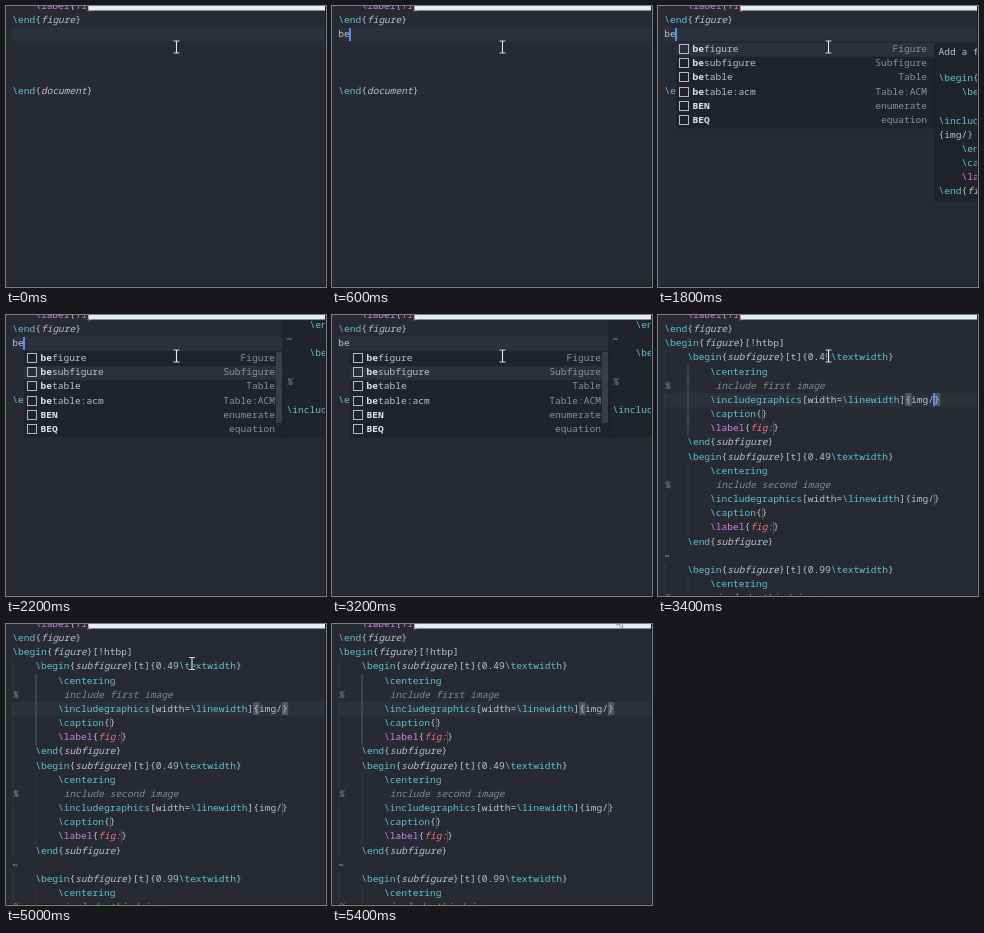
Write an HTML page with a canvas that moves like this. It is 320x281 px and loops after 5.6 s.

```html
<!DOCTYPE html>
<html lang="en">
<head>
<meta charset="utf-8">
<title>LaTeX snippet completion</title>
<style>
html, body { margin: 0; width: 100%; height: 100%; overflow: hidden; background: #272a32; }
canvas { display: block; width: 320px; height: 281px; }
</style>
</head>
<body>
<canvas width="320" height="281"></canvas>
<script>
const ctx = document.querySelector('canvas').getContext('2d');
const LOOP = 5600, LEFT = 6.2, CHAR = 5.74, PITCH = 14.17, FIRST = 14;
const FONT = '9.57px "Noto Sans Mono", monospace';
const color = {
  back: '#272a32', line: '#2c303b', popup: '#20232a', selected: '#2d313b', edge: '#1b1e24',
  text: '#bac1cd', command: '#5cc3d2', label: '#d27fe8', key: '#ec727c', comment: '#838995',
  strong: '#dfe2e8', detail: '#8b909a', guide: '#343841', activeGuide: '#555b67',
  tabStop: '#4c525e', bracket: '#515762', caret: '#528bff', paper: '#e4edf4'
};

const subfigure = (width, order) => [
  `    \\begin{subfigure}[t]{${width}\\textwidth}`,
  '        \\centering',
  `%        include ${order} image`,
  '        \\includegraphics[width=\\linewidth]{img/}',
  '        \\caption{}',
  '        \\label{fig:}',
  '    \\end{subfigure}'
];
const head = ['    \\label{fig:}', '\\end{figure}'];
const expanded = [...head, '\\begin{figure}[!htbp]',
  ...subfigure('0.49', 'first'), ...subfigure('0.49', 'second'), '~',
  ...subfigure('0.99', 'third').slice(0, 3)];
const figureDoc = ['\\begin{figure}[!htbp]', '    \\begin{center}', '', '\\includegraphics',
  '{img/}', '    \\end{center}', '    \\caption{}', '    \\label{fig:}', '\\end{figure}'];
const subfigureDoc = ['    \\end{subfigure}', '~', '    \\begin{subfigure}', '', '%', '',
  '\\includegraphics'];
const choices = [['befigure', 'Figure'], ['besubfigure', 'Subfigure'], ['betable', 'Table'],
  ['betable:acm', 'Table:ACM'], ['BEN', 'enumerate'], ['BEQ', 'equation']];

const rowY = row => FIRST + (row - 1) * PITCH;
const columnX = column => LEFT + column * CHAR;

function rect(x, y, w, h, fill) {
  ctx.fillStyle = fill;
  ctx.fillRect(x, y, w, h);
}

function write(text, x, y, fill, style = '') {
  ctx.font = `${style} ${FONT}`;
  ctx.fillStyle = fill;
  ctx.fillText(text, x, Math.round(y + 3.1));
}

function codeLine(line, x, y) {
  if (line[0] === '%') {
    write('%', x, y, color.comment, 'italic');
    write(line.slice(1), x + CHAR, y, color.comment, 'italic');
    return;
  }
  let column = 0, command = '', inBraces = false;
  for (const token of line.match(/\\\w+|[{}]|[^\\{}]+/g) || []) {
    let fill = color.text, style = '';
    if (token[0] === '\\') {
      command = token;
      fill = token === '\\label' ? color.label : color.command;
    } else if (token === '{') {
      inBraces = true;
    } else if (token === '}') {
      inBraces = false;
      command = '';
    } else if (inBraces && /begin|end$|label/.test(command)) {
      style = 'italic';
      if (command === '\\label') fill = color.key;
    }
    write(token, x + column * CHAR, y, fill, style);
    column += token.length;
  }
}

function snippetMarks() {
  expanded.forEach((line, row) => {
    if (row < 3) return;
    const top = Math.round(rowY(row) - 7), indent = line.search(/\S/);
    const guide = (column, fill) => rect(Math.ceil(columnX(column)) - 0.5, top, 1, 15, fill);
    const deep = indent >= 8 || line[0] === '%';
    if (indent >= 4) guide(0, color.guide);
    if (deep) guide(4, row < 9 ? color.activeGuide : color.guide);
    if (/(img\/|caption\{|fig:)\}/.test(line)) {
      rect(Math.round(columnX(line.length - 1)), top + 1, 1, 13, color.tabStop);
    }
  });
}

function caret(column, row) {
  rect(Math.round(columnX(column) - 0.8), Math.round(rowY(row) - 6.5), 2, 13, color.caret);
}

function menu(selected) {
  rect(18, 36.5, 259, 86, color.popup);
  rect(18, 37 + selected * PITCH, 259, PITCH - 0.5, color.selected);
  if (selected) rect(270, 37, 6, 71, '#393e48');
  choices.forEach(([name, kind], i) => {
    const y = 43 + i * PITCH;
    ctx.strokeStyle = '#b4bac5';
    ctx.lineWidth = 1;
    ctx.strokeRect(21.5, Math.round(y) - 4.5, 9, 9);
    write(name.slice(0, 2), 34.6, y, color.strong, 'bold');
    write(name.slice(2), 34.6 + 2 * CHAR, y, i > 3 ? color.strong : color.text, i > 3 ? 'bold' : '');
    write(kind, 269 - kind.length * CHAR, y, color.detail);
  });
}

function docs(selected) {
  const top = selected ? 5 : 37, bottom = selected ? 122.5 : 195;
  const lines = selected ? subfigureDoc : figureDoc;
  rect(277, top, 43, bottom - top, color.popup);
  rect(276.5, top, 1, bottom - top, color.edge);
  if (!selected) write('Add a figure', 280.6, 46, color.text);
  lines.forEach((line, i) => codeLine(line, 280.6, (selected ? 10 : 72) + i * PITCH));
}

function pointer(x, y) {
  const beam = () => {
    ctx.beginPath();
    ctx.moveTo(x - 3, y - 6); ctx.lineTo(x + 3, y - 6);
    ctx.moveTo(x, y - 6); ctx.lineTo(x, y + 6);
    ctx.moveTo(x - 3, y + 6); ctx.lineTo(x + 3, y + 6);
    ctx.stroke();
  };
  ctx.strokeStyle = '#15171b';
  ctx.lineWidth = 2.6;
  beam();
  ctx.strokeStyle = '#e8eaee';
  ctx.lineWidth = 1.2;
  beam();
}

// Tip of the pointer as it leaves through the top edge.
function pointerTip() {
  ctx.strokeStyle = '#8a94a2';
  ctx.lineWidth = 1;
  ctx.beginPath();
  ctx.moveTo(284, 1.5); ctx.lineTo(287, 0);
  ctx.moveTo(287, 0); ctx.lineTo(289, 3.5); ctx.lineTo(291, 2.5); ctx.lineTo(290, 0);
  ctx.stroke();
}

const within = (t, ...spans) => spans.some(([from, to]) => t >= from && t < to);

function draw(t) {
  const done = t >= 3400;
  const row = done ? 6 : 2;
  rect(0, 0, 320, 281, color.back);
  rect(6, Math.round(rowY(row) - 7), 314, 14, color.line);
  rect(0, 280, 320, 1, color.edge);

  if (done) {
    snippetMarks();
    for (const column of [42, 47]) rect(columnX(column), Math.round(rowY(6) - 6.5), CHAR + 0.5, 13, color.bracket);
    expanded.forEach((line, i) => codeLine(line, LEFT, rowY(i)));
    if (within(t, [3400, 4000], [4400, 5000])) caret(47, 6);
  } else {
    const typed = t < 200 ? '' : t < 600 ? 'b' : 'be';
    [...head, typed, '', '', '', '\\end{document}'].forEach((line, i) => codeLine(line, LEFT, rowY(i)));
    if (within(t, [200, 1200], [1800, 2400], [2800, 3200])) caret(typed.length, 2);
    if (t >= 800) {
      const selected = t < 2200 ? 0 : 1;
      menu(selected);
      docs(selected);
    }
  }

  rect(82.5, 0, 237.5, 4.5, color.paper);
  rect(319, 0, 1, 281, color.edge);
  if (t < 5000) pointer(170.5, 41);
  else if (t < 5200) pointer(186, 39.5);
  else if (t < 5400) pointer(288.5, -3);
  else pointerTip();
}

function tick() {
  draw(performance.now() % LOOP);
  requestAnimationFrame(tick);
}
tick();
</script>
</body>
</html>
```
